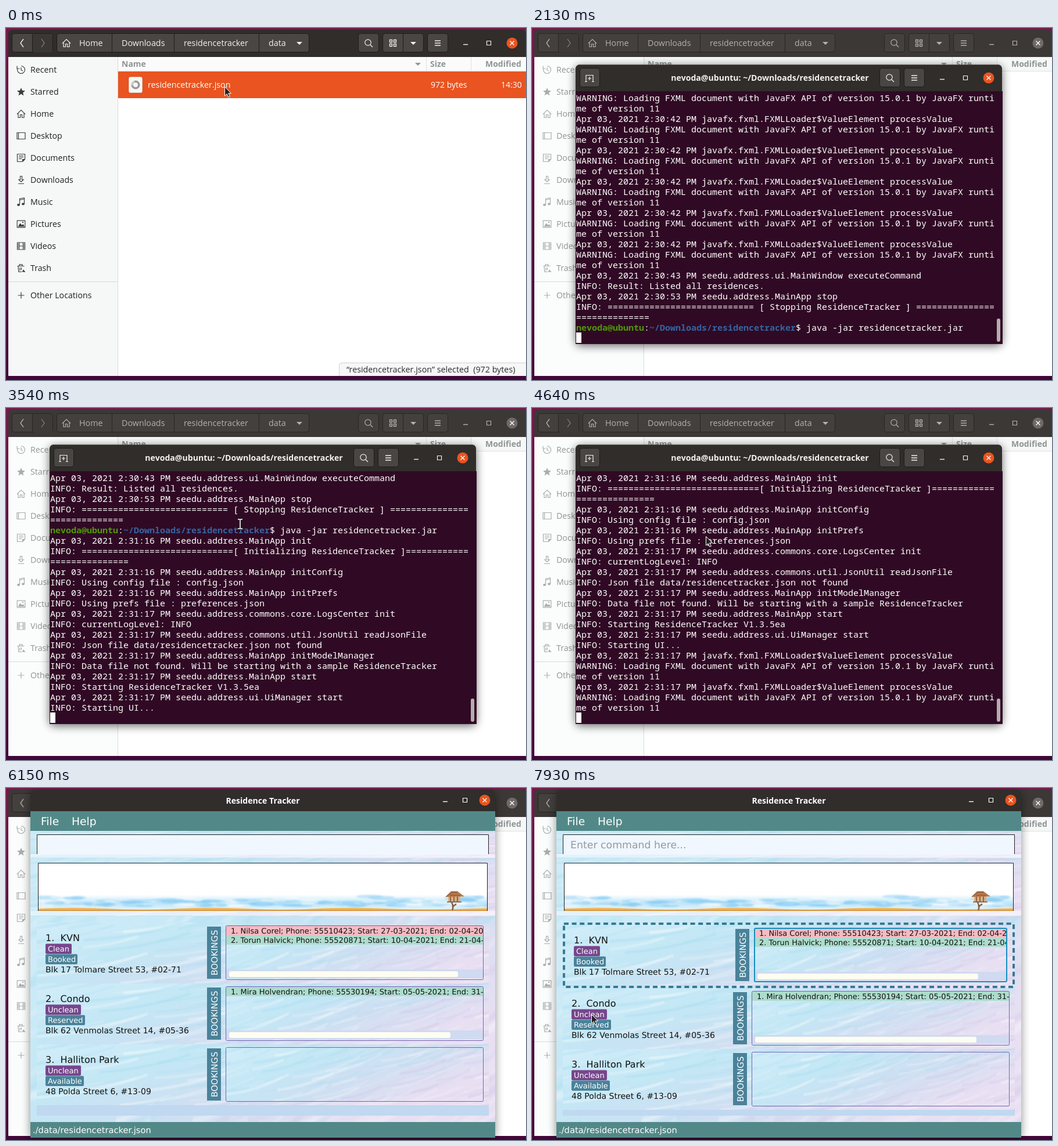
These frames come from a looping animation (895 px wide and 607 px high, 8000 ms). An HTML page:

```html
<!DOCTYPE html>
<html lang="en">
<head>
<meta charset="utf-8">
<title>Residence Tracker start-up</title>
<style>
html, body { margin: 0; width: 100%; height: 100%; overflow: hidden; background: #43093a; }
svg { display: block; }
text { white-space: pre; }
.ui { font-family: "Open Sans", "Noto Sans", sans-serif; }
.app { font-family: "DejaVu Sans", sans-serif; text-rendering: geometricPrecision; }
.mono { font-family: "Noto Sans Mono", monospace; }
.bold { font-weight: 700; }
.mid { text-anchor: middle; }
</style>
</head>
<body>
<svg id="stage" width="895" height="607" viewBox="0 0 895 607"></svg>
<script>
const LOOP = 8000;
const ORANGE = '#e95420', TEAL = '#528988', BLUE = '#4a8299', PLUM = '#77468c';

const rect = (x, y, w, h, fill, more = '') =>
  `<rect x="${x}" y="${y}" width="${w}" height="${h}" fill="${fill}" ${more}/>`;
const text = (x, y, s, size, fill, cls = 'ui') =>
  `<text x="${x}" y="${y}" font-size="${size}" fill="${fill}" class="${cls}">${s}</text>`;
const line = (d, color, w = 1, more = '') =>
  `<path d="${d}" fill="none" stroke="${color}" stroke-width="${w}" ${more}/>`;
const solid = (d, color) => `<path d="${d}" fill="${color}"/>`;
const group = (id, body) => `<g id="${id}">${body}</g>`;
const use = (id, x, y, w, h) => `<use href="#${id}" x="${x}" y="${y}" width="${w}" height="${h}"/>`;
const topRounded = (x, y, w, h, fill) =>
  solid(`M${x} ${y + h}v${8 - h}q0-8 8-8h${w - 16}q8 0 8 8v${h - 8}z`, fill);
const shadow = (x, y, w, h, alpha) => rect(x, y + 3, w, h, '#000', `rx="8" opacity="${alpha}" filter="url(#soft)"`);

function random(seed) {
  return () => (seed = (seed * 16807) % 2147483647) / 2147483647;
}

// Brushed watercolour, stretched over every pane of the application.
function washBody() {
  const rnd = random(77);
  let strokes = '';
  for (let i = 0; i < 150; i++) {
    const x = rnd() * 860 - 80, y = rnd() * 135, len = 50 + rnd() * 150;
    const warm = x / 1000 + y / 350 > .45 + rnd() * .4;
    const color = rnd() < .45 ? '#fff' : warm ? '#cbbfe4' : '#9fdaee';
    strokes += line(`M${x | 0} ${y | 0}q${len * .5 | 0} ${-3 - rnd() * 4 | 0} ${len | 0} ${-len * .2 | 0}`,
      color, (1 + rnd() * 4).toFixed(1), `opacity="${(.12 + rnd() * .25).toFixed(2)}" stroke-linecap="round"`);
  }
  return rect(0, 0, 778, 105, 'url(#sky)') + `<g filter="url(#blur)">${strokes}</g>`;
}

function landscapeBody() {
  const rnd = random(19);
  let puffs = '';
  for (let i = 0; i < 150; i++) {
    const x = rnd() * 774, rise = 13 + 4 * Math.sin(x / 29), y = 75 - rnd() * rise;
    puffs += `<ellipse cx="${x | 0}" cy="${y | 0}" rx="${8 + rnd() * 20 | 0}" ry="${(1 + rnd() * 2.5).toFixed(1)}"
      fill="${rnd() < .35 ? '#fff' : '#84cbf2'}" opacity=".42"/>`;
  }
  let out = rect(0, 0, 774, 83, '#fff') + rect(0, 55, 774, 25, 'url(#haze)') + `<g filter="url(#blur)">${puffs}</g>`;
  out += solid('M0 79q60-3 120 0t120 0 120 0 120 0 120 0 174-1v5H0z', '#f1b65a') + line('M0 82H774', '#d18c35', 1.4);
  out += line('M713 82q3-6-1-14M713 76l7-5', '#8c5a40', 2.5) + rect(706, 58, 21, 9, '#d9b084');
  out += line('M704 67.500h25', '#76513c', 1.5) + line('M710 58v9M716 58v9M722 58v9', '#94623f', 2);
  return out + solid('M701 59l10-10h11l12 9z', '#b9794a') + line('M703 58l9-7h10M709 56h18', '#7d4f38', 1);
}

const defs = `<defs>
  <linearGradient id="wall" x2="0" y2="1"><stop stop-color="#76194a"/><stop offset=".4" stop-color="#56103f"/><stop offset="1" stop-color="#410739"/></linearGradient>
  <linearGradient id="sky" x2="1" y2=".5"><stop stop-color="#d2edf9"/><stop offset=".35" stop-color="#c3e7f5"/><stop offset=".65" stop-color="#cfdff2"/><stop offset="1" stop-color="#e8dff2"/></linearGradient>
  <linearGradient id="haze" x2="0" y2="1"><stop stop-color="#fff"/><stop offset=".6" stop-color="#bde5f9"/><stop offset="1" stop-color="#e4f3f8"/></linearGradient>
  <filter id="blur"><feGaussianBlur stdDeviation="1"/></filter>
  <filter id="soft" x="-10%" y="-10%" width="120%" height="120%"><feGaussianBlur stdDeviation="8"/></filter>
  <clipPath id="screen"><rect x="75" y="111" width="725" height="432"/></clipPath>
  <symbol id="wash" viewBox="0 0 778 105" preserveAspectRatio="none">${washBody()}</symbol>
  <symbol id="landscape" viewBox="0 0 774 83" preserveAspectRatio="none">${landscapeBody()}</symbol>
</defs>`;

const ICONS = {
  Recent: ['M8 1.5a6.5 6.5 0 1 1-6.3 5M8 4v4.5l3 1.5M1 1.5V6h4.5'],
  Starred: ['', 'M8 1l2 4.8 5 .4-3.8 3.3 1.2 5L8 11.8 3.6 14.5l1.2-5L1 6.2l5-.4z'],
  Home: ['M.8 8.7L8 1.5l7.2 7.2M3 7v7.5h3.5v-5h3v5H13V7'],
  Desktop: ['M1 2.5h14v11H1zM3.5 3v10'],
  Documents: ['M1.5 1.5h13v9l-4 4h-9zM4 4.5h8M4 7h8M4 9.5h5', 'M10 15v-5h5z'],
  Downloads: ['M6.5 1.5h3v6H12L8 11.5l-4-4h2.5zM3 14.5h10'],
  Music: ['M5.5 12.5V2.5L13.5 1v10M5.5 4.5l8-1.5', 'M1 13a2.4 2 0 1 0 5 0 2.4 2 0 1 0-5 0M9 11.5a2.4 2 0 1 0 5 0 2.4 2 0 1 0-5 0'],
  Pictures: ['M1.2 2.2h13.6v11.6H1.2z', 'M2.5 12.5l4-6 3 3.5 2-2 2.5 4.5zM10 4h2v2h-2z'],
  Videos: ['M1.5 2h13v12h-13zM4.5 2v12M11.5 2v12M4.5 8h7M1.5 5h3M1.5 8h3M1.5 11h3M11.5 5h3M11.5 8h3M11.5 11h3'],
  Trash: ['M1.5 4.5h12M5 4V1.8h5V4M3 5l.8 9.5H9M6 7v5.5M8.5 7v4', 'M9.5 14.5l2.5-4 3.5 4.5z'],
  'Other Locations': ['M2.5 8h11M8 2.5v11']
};
function icon(name, x, y, color) {
  const [d, fill = ''] = ICONS[name];
  return `<g transform="translate(${x} ${y})">${line(d, color, 1.2)}${solid(fill, color)}</g>`;
}

const button = (x, y, w, c) => rect(x + .5, y + .5, w - 1, 32, c.btn, `rx="4" stroke="${c.edge}"`);
const search = (x, y, color) =>
  `<circle cx="${x - 1}" cy="${y - 1}" r="5.2" fill="none" stroke="${color}" stroke-width="1.2"/>` + line(`M${x + 3} ${y + 3}l4 4`, color, 1.3);
const menu = (x, y, color) => line(`M${x - 5} ${y - 4}h10m-10 4h10m-10 4h10`, color, 1.4);
const caret = (x, y, color) => solid(`M${x - 5} ${y - 2}h10l-5 5z`, color);
function windowButtons(close, y, gap, color, disc) {
  return line(`M${close - 2 * gap - 4} ${y + 2.5}h8`, color, 1.4) + line(`M${close - gap - 3.5} ${y - 3.5}h7v7h-7z`, color, 1.2) +
    `<circle cx="${close}" cy="${y}" r="9.5" fill="${disc}"/>` + line(`M${close - 3.5} ${y - 3.5}l7 7m0-7l-7 7`, '#fff', 1.4);
}

const FOCUSED = { bar: '#302d2b', btn: '#494643', off: '#3a3735', edge: '#1e1c1b', fg: '#f3f2f1', disc: ORANGE,
  side: '#f6f7f7', text: '#1f2020', icon: '#3d3d3d', head: '#fbfbfb' };
const BACKDROP = { bar: '#3b3836', btn: '#43403d', off: '#3d3a38', edge: '#282624', fg: '#b3b0ad', disc: '#6d6a67',
  side: '#fbfcfc', text: '#929595', icon: '#aaadad', head: '#f6f7f7' };

function filesWindow(c) {
  let s = topRounded(4, 3, 891, 47, c.bar) + rect(4, 50, 891, 550, '#fff');
  s += button(10, 9, 71, c) + rect(46, 10, 34, 32, c.off, 'rx="3"') + line('M45.5 10v32', c.edge);
  s += line('M30 19l-5 7 5 7', c.fg, 1.3) + line('M61 19l5 7-5 7', '#8a8784', 1.2);
  s += button(87, 9, 435, c) + line('M182.5 10v32M289.5 10v32M435.5 10v32', c.edge) + icon('Home', 96, 18, c.fg);
  for (const [x, name] of [[126, 'Home'], [199, 'Downloads'], [306, 'residencetracker'], [452, 'data']])
    s += text(x, 31, name, 14.3, c.fg);
  s += caret(505, 26, c.fg) + button(606, 9, 36, c) + search(624, 26, c.fg);
  s += button(648, 9, 71, c) + line('M683.5 10v32', c.edge);
  s += line('M660.5 20.5h4v4h-4zm7 0h4v4h-4zm-7 7h4v4h-4zm7 0h4v4h-4z', c.fg, 1.3);
  s += caret(701, 26, c.fg) + button(725, 9, 36, c) + menu(743, 26, c.fg) + windowButtons(871, 26, 40, c.fg, c.disc);
  s += rect(193, 50, 702, 24, c.head) + line('M193 74.5H895M723.5 50v24M800.5 50v24', '#dfe1e1');
  for (const [x, name] of [[199, 'Name'], [730, 'Size'], [825, 'Modified']])
    s += text(x, 67, name, 14, '#8f9494', 'ui bold');
  s += caret(709, 62, '#8f9494') + rect(4, 50, 188, 550, c.side) + line('M192.5 50V600M4 437.5H192', '#d8dada');
  Object.keys(ICONS).forEach((name, i) => {
    const y = 72 + i * 38 + (i === 10 ? 9 : 0);
    s += icon(name, 18, y - 8, c.icon) + text(42, y + 5, name, 14.2, c.text);
  });
  return s;
}

const fileRow = rect(193, 75, 702, 46, ORANGE) +
  rect(211, 84, 24, 28, '#f7f7f5', 'rx="3" stroke="#b9502c" stroke-width=".6"') +
  '<circle cx="223" cy="98" r="5.8" fill="none" stroke="#999" stroke-width="3.6"/>' +
  line('M217.4 99a5.8 5.8 0 0 1 4-6.5', '#ccc', 3.6) +
  text(244, 103, 'residencetracker.json', 14.3, '#fff') + text(731, 103, '972 bytes', 14, '#fff') + text(852, 103, '14:30', 14, '#fff');
const fileStatus = solid('M573 600v-18q0-5 5-5h317v23z', '#f6f7f7') + line('M573.5 600v-18q0-4.500 5-4.500H895', '#cfd1d1') +
  text(586, 594, '“residencetracker.json” selected  (972 bytes)', 14.3, '#2b2b2b');

const stamp = (time, source) => `Apr 03, 2021 2:${time} PM ${source}`;
const rule = n => '='.repeat(n);
const fxml = time => [stamp(time, 'javafx.fxml.FXMLLoader$ValueElement processValue'),
  'WARNING: Loading FXML document with JavaFX API of version 15.0.1 by JavaFX runti', 'me of version 11'];
const bold = (s, color) => `<tspan class="bold" fill="${color}">${s}</tspan>`;
const LOG = [
  ...Array(6).fill(fxml('30:42')).flat(),
  stamp('30:43', 'seedu.address.ui.MainWindow executeCommand'),
  'INFO: Result: Listed all residences.',
  stamp('30:53', 'seedu.address.MainApp stop'),
  `INFO: ${rule(28)} [ Stopping ResidenceTracker ] ${rule(15)}`, rule(14),
  bold('nevoda@ubuntu', '#4e9a06') + ':' + bold('~/Downloads/residencetracker', '#3465a4') +
    '$ <tspan id="command">java -jar residencetracker.jar</tspan>',
  stamp('31:16', 'seedu.address.MainApp init'),
  `INFO: ${rule(29)}[ Initializing ResidenceTracker ]${rule(12)}`, rule(15),
  stamp('31:16', 'seedu.address.MainApp initConfig'), 'INFO: Using config file : config.json',
  stamp('31:16', 'seedu.address.MainApp initPrefs'), 'INFO: Using prefs file : preferences.json',
  stamp('31:17', 'seedu.address.commons.core.LogsCenter init'), 'INFO: currentLogLevel: INFO',
  stamp('31:17', 'seedu.address.commons.util.JsonUtil readJsonFile'), 'INFO: Json file data/residencetracker.json not found',
  stamp('31:17', 'seedu.address.MainApp initModelManager'),
  'INFO: Data file not found. Will be starting with a sample ResidenceTracker',
  stamp('31:17', 'seedu.address.MainApp start'), 'INFO: Starting ResidenceTracker V1.3.5ea',
  stamp('31:17', 'seedu.address.ui.UiManager start'), 'INFO: Starting UI...',
  ...fxml('31:17'), ...fxml('31:17')
];

function terminalHeader(c) {
  return topRounded(75, 63, 734, 47, c.bar) + line('M83 63.5H801', '#55514e') + button(82, 69, 35, c) +
    line('M93 92.500V81.500H105V92.500M91 92.500H95M103 92.500H107M99 84v6M96 87h6', c.fg, 1.2) +
    text(409.5, 91, 'nevoda@ubuntu: ~/Downloads/residencetracker', 14.1, c.fg, 'ui bold mid') +
    button(598, 69, 36, c) + search(616, 86, c.fg) + button(640, 69, 36, c) + menu(658, 86, c.fg) +
    windowButtons(786, 86, 40, c.fg, c.disc);
}
const terminal = group('termShadow', shadow(75, 63, 734, 482, .6)) +
  group('termOn', terminalHeader(FOCUSED)) + group('termOff', terminalHeader(BACKDROP)) +
  rect(75, 109, 735, 436, '#300a24') + rect(800, 501, 6, 40, '#b5adb0', 'rx="3"') +
  `<g clip-path="url(#screen)">${group('log', LOG.map((s, i) => text(76, 126 + 18 * i, s, 15, '#fff', 'mono')).join(''))}</g>` +
  '<rect id="caret" y="525" width="9" height="18" stroke="#fff"/>';

const CARDS = [
  { name: 'KVN', clean: 'Clean', state: 'Booked', place: 'Blk 17 Tolmare Street 53, #02-71', thumb: 394, rows: [
    ['#f6bac2', '1. Nilsa Corel; Phone: 55510423; Start: 27-03-2021; End: 02-04-2021'],
    ['#addccd', '2. Torun Halvick; Phone: 55520871; Start: 10-04-2021; End: 21-04-2021']] },
  { name: 'Condo', clean: 'Unclean', state: 'Reserved', place: 'Blk 62 Venmolas Street 14, #05-36', thumb: 381, rows: [
    ['#addccd', '1. Mira Holvendran; Phone: 55530194; Start: 05-05-2021; End: 31-05-2021']] },
  { name: 'Halliton Park', clean: 'Unclean', state: 'Available', place: '48 Polda Street 6, #13-09', rows: [] }
];
const LABEL_WIDTH = { Clean: 45, Unclean: 61, Booked: 55, Reserved: 68, Available: 66 };
const label = (x, y, s, fill) => rect(x, y, LABEL_WIDTH[s], 17.5, fill, 'rx="2"') + text(x + 4, y + 13, s, 13, '#fff', 'app');

function bookings(x, y, card, selected) {
  const w = selected ? 436 : 444;
  let s = use('wash', 0, 0, w, 93);
  card.rows.forEach(([fill, row], i) => {
    s += rect(1, 1 + 16 * i, w - 2, 16, fill) + text(9, 14 + 16 * i, row, 13, '#111', 'app');
  });
  if (card.thumb) s += rect(1, 76, w - 2, 15, '#d0daf0') + rect(6, 79, card.thumb - (selected ? 14 : 0), 10, '#fdfdf1', 'rx="3"');
  s += selected ? rect(1, 1, w - 2, 92, 'none', 'rx="2" stroke="#168fbd" stroke-width="2"')
    : rect(.5, .5, w - 1, 93, 'none', 'rx="2" stroke="#7266b4"');
  return `<svg x="${x}" y="${y}" width="${w}" height="94">${s}</svg>`;
}

function cardList(pick) {
  let y = 232, s = '';
  CARDS.forEach((card, i) => {
    const selected = i === pick, pad = selected ? 4 : 0, h = 105 + 2 * pad, x = 68 + pad, top = y + pad;
    s += use('wash', 53, y, 778, h) + text(x, top + 32, `${i + 1}.  ${card.name}`, 16, '#111', 'app');
    s += label(x, top + 36.5, card.clean, PLUM) + label(x, top + 54.5, card.state, BLUE);
    s += text(x, top + 86, card.place, 14, '#111', 'app') + rect(x + 278, top + 7, 24, 90, BLUE);
    s += `<g transform="translate(${x + 295.5} ${top + 52}) rotate(-90)">${text(0, 0, 'BOOKINGS', 14.67, '#fff', 'app mid')}</g>`;
    s += bookings(x + 310, top + 5, card, selected);
    if (selected) s += rect(55, y + 2, 774, h - 4, 'none', 'stroke="#347b92" stroke-width="4" stroke-dasharray="8 5.6"');
    y += h;
  });
  return s + rect(53, y, 778, 565 - y, '#c0d8f0');
}

function appPanes(w, statusY) {
  const right = 42 + w;
  return rect(42, 40, w, 34, TEAL) + text(60, 64, 'File', 18.67, '#fff', 'app') + text(113, 64, 'Help', 18.67, '#fff', 'app') +
    use('wash', 42, 74, w, 47) + use('wash', 42, 121, w, 100) + use('wash', 42, 221, w, statusY - 221) +
    rect(42, 114, w, 6, '#fff', 'opacity=".5"') + rect(42, 212, w, 8, '#fff', 'opacity=".5"') +
    rect(53, 80, w - 22, 35, '#f0f7fe') + line(`M53.5 114V80.500H${right - 11.5}V114`, '#222') +
    use('landscape', 55, 129, w - 26, 83) + line(`M55.5 212V129.500H${right - 13.5}V212`, '#222') +
    rect(42, statusY, w, 27, TEAL) + text(46, statusY + 19, './data/residencetracker.json', 14.67, '#fff', 'app');
}
const app = shadow(42, 4, 800, 599, .45) + topRounded(42, 4, 800, 36, FOCUSED.bar) +
  text(442, 27, 'Residence Tracker', 14.1, '#fff', 'ui bold mid') + windowButtons(824, 21, 34, '#fff', ORANGE) +
  rect(42, 40, 800, 500, '#fff') + rect(42, 540, 800, 63, '#000') +
  group('small', appPanes(340, 243)) +
  group('full', appPanes(800, 576) + group('plain', cardList(-1)) +
    group('picked', cardList(0) + text(66, 104, 'Enter command here...', 17.33, '#94999e', 'app')));

const ibeam = 'M-4-8h3l1 1 1-1h3M0-7V7M-4 8h3l1-1 1 1h3';
stage.innerHTML = defs + rect(0, 0, 895, 607, 'url(#wall)') +
  group('filesOn', filesWindow(FOCUSED)) + group('filesOff', filesWindow(BACKDROP)) +
  group('row', fileRow) + group('status', fileStatus) + group('terminal', terminal) + group('app', app) +
  group('pointer',
    group('arrow', '<path d="M.5.5v15.500l3.700-3.300 2.600 5.700 2.600-1.200-2.600-5.500h4.700z" fill="#222" stroke="#fff"/>') +
    group('beam', line(ibeam, '#222', 3.4) + line(ibeam, '#fff', 1.5)));

const TOP_LINE = [[0, 0], [2060, 1], [3070, 4], [3370, 8], [3450, 13], [3540, 18], [3610, 21], [4250, 24]];
const CARET_X = [[0, 472], [1660, 751], [2060, 76]];
const CARET_ON = [[0, true], [2670, false], [3220, true], [3850, false], [4480, true]];
const POINTER = [[0, 'arrow'], [1270, 'beam'], [1660, ''], [2670, 'beam'], [4480, 'arrow'], [6070, ''], [6440, 'arrow']];
const PATH = [[0, 376, 101], [1030, 376, 101], [1510, 403, 200], [3605, 403, 200], [3610, 392, 209], [3850, 392, 209],
  [3940, 387, 210], [4480, 387, 210], [4640, 299, 221], [4720, 299, 221], [5360, 321, 248], [5740, 321, 248],
  [6070, 330, 290], [6440, 330, 290], [7240, 74, 271], [7700, 103, 412], [7930, 102, 390]];

const nodes = {};
for (const el of stage.querySelectorAll('[id]')) nodes[el.id] = el;
const logLines = [...nodes.log.children];
const show = (id, on) => { nodes[id].style.display = on ? '' : 'none'; };
const stepAt = (steps, t) => steps.filter(s => s[0] <= t).pop()[1];
function pointAt(t) {
  const i = PATH.findIndex(p => p[0] > t);
  if (i < 0) return PATH[PATH.length - 1].slice(1);
  const [t0, x0, y0] = PATH[i - 1], [t1, x1, y1] = PATH[i], k = (t - t0) / (t1 - t0);
  return [Math.round(x0 + (x1 - x0) * k), Math.round(y0 + (y1 - y0) * k)];
}

function draw(t) {
  const opened = t >= 1110, lost = t >= 5290;
  show('filesOn', !opened);
  show('filesOff', opened);
  show('row', t < 550);
  show('status', t < 790);
  show('terminal', opened && t < 5510);
  show('termOn', !lost);
  show('termOff', lost);
  nodes.termShadow.setAttribute('opacity', t < 5200 ? 1 : .6);
  show('command', t >= 1660);

  const top = stepAt(TOP_LINE, t), end = top ? top + 23 : 24;
  nodes.log.setAttribute('transform', `translate(0 ${-18 * top})`);
  logLines.forEach((el, i) => { el.style.display = i >= top && i < end ? '' : 'none'; });
  show('caret', stepAt(CARET_ON, t));
  nodes.caret.setAttribute('x', stepAt(CARET_X, t));
  nodes.caret.setAttribute('fill', t < 5200 ? '#fff' : 'none');
  nodes.caret.setAttribute('stroke-width', t < 5200 ? 0 : 1);

  show('app', t >= 5510);
  show('small', t < 5740);
  show('full', t >= 5740);
  show('plain', t < 6840);
  show('picked', t >= 6840);

  const kind = stepAt(POINTER, t);
  show('arrow', kind === 'arrow');
  show('beam', kind === 'beam');
  nodes.pointer.setAttribute('transform', `translate(${pointAt(t).join(' ')})`);
}

const start = performance.now();
function tick() {
  draw((performance.now() - start) % LOOP);
  requestAnimationFrame(tick);
}
tick();
</script>
</body>
</html>
```
